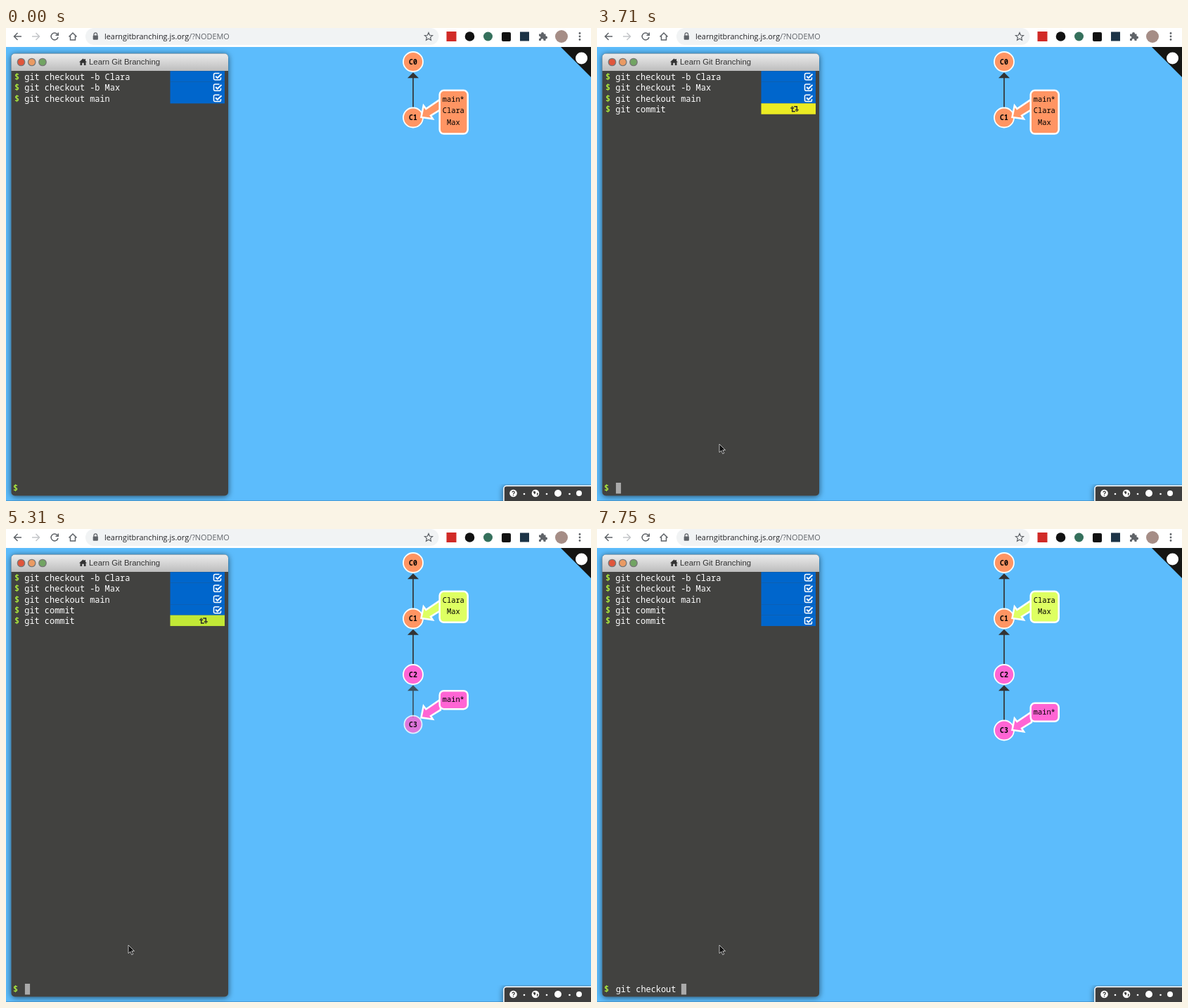
Recreate the animation shown at these times as an HTML page. Size 832 px wide and 673 px high, loop 8000 ms.

```html
<!DOCTYPE html>
<html lang="en">
<head>
<meta charset="utf-8">
<title>Git branching demo</title>
<style>
html, body { margin: 0; width: 100%; height: 100%; overflow: hidden; background: #5cbcfc; }
svg { display: block; }
text { white-space: pre; }
.mono { font-family: "Noto Sans Mono", "DejaVu Sans Mono", monospace; }
.term { font-size: 11.92px; fill: #fff; }
.dollar { font-size: 11.92px; font-weight: 700; fill: #a9e63c; }
.node { font-size: 9.8px; font-weight: 700; text-anchor: middle; }
.label { font-size: 10.35px; text-anchor: middle; }
.url { font-family: "Open Sans", "Noto Sans", sans-serif; font-size: 10.9px; fill: #202124; }
.title { font-family: "Liberation Sans", Arial, sans-serif; font-size: 11.36px; fill: #333; }
.tool { fill: none; stroke: #5f6368; stroke-width: 1.5; }
</style>
</head>
<body>
<svg width="832" height="673" viewBox="0 0 832 673" xmlns="http://www.w3.org/2000/svg">
  <defs>
    <linearGradient id="bar" x2="0" y2="1"><stop stop-color="#ececec"/><stop offset="1" stop-color="#bdbdbd"/></linearGradient>
    <filter id="shadow" x="-10%" y="-10%" width="120%" height="120%">
      <feDropShadow dx="0" dy="1" stdDeviation="4" flood-color="#000" flood-opacity=".6"/>
    </filter>
  </defs>
  <rect width="832" height="673" fill="#5cbcfc"/>
  <rect y="672" width="832" height="1" fill="#4a9cd6"/>

  <g id="window">
    <rect x="7.5" y="36.5" width="308.5" height="629" rx="5" fill="#424240" filter="url(#shadow)"/>
    <path d="M7.5 61V41.500a5 5 0 0 1 5-5H311a5 5 0 0 1 5 5V61Z" fill="url(#bar)"/>
    <g stroke="#777" stroke-width="1.3">
      <circle cx="21.500" cy="48.500" r="5.200" fill="#e0563c"/>
      <circle cx="36.700" cy="48.500" r="5.200" fill="#ea9a63"/>
      <circle cx="52" cy="48.500" r="5.200" fill="#72a463"/>
    </g>
    <path d="M104 48.500L109.500 43.500L111.500 45.300V44H113V46.700L115 48.500H113.500V53H110.800V49.800H108.200V53H105.500V48.500Z" fill="#333"/>
    <text class="title" x="118" y="52.300">Learn Git Branching</text>
  </g>

  <g id="browser">
    <rect width="832" height="27" fill="#fff"/>
    <rect x="113" y="0" width="502.500" height="24" rx="12" fill="#f1f3f4"/>
    <g class="tool">
      <path d="M22 12H12M16.500 7L11.500 12L16.500 17"/>
      <path d="M37 12H47M42.500 7L47.500 12L42.500 17" stroke="#c4c6c9"/>
      <path d="M73.200 9A5 5 0 1 0 74 13M74.300 6.500V10.300H70.500"/>
      <path d="M89.500 12.500L95 7L100.500 12.500M91.500 11.500V17H98.500V11.500"/>
      <path d="M125 11V9.200a2.300 2.300 0 0 1 4.600 0V11" stroke-width="1.200"/>
      <path d="M601 6.500L602.600 10.300L606.600 10.600L603.600 13.300L604.500 17.300L601 15.200L597.500 17.300L598.400 13.300L595.400 10.600L599.400 10.300Z" stroke-width="1.200"/>
    </g>
    <rect x="123.700" y="10.500" width="7.200" height="6.200" rx="1" fill="#5f6368"/>
    <text class="url" x="140" y="16">learngitbranching.js.org<tspan fill="#5f6368">/?NODEMO</tspan></text>
    <rect x="626.500" y="5" width="14" height="14" fill="#d12b27"/>
    <circle cx="659.500" cy="12" r="6.800" fill="#111"/>
    <circle cx="685.500" cy="12" r="6.500" fill="#35705c"/>
    <rect x="705" y="6" width="13" height="13" rx="2" fill="#111"/>
    <rect x="731" y="5.500" width="13" height="13" fill="#1c3346"/>
    <path d="M758 8.500H761V8a2 2 0 0 1 4 0V8.500H767.500V11.500H768a2 2 0 0 1 0 4H767.500V18H764.500V17a1.800 1.800 0 0 0-3.600 0V18H758V15H758.500a1.800 1.800 0 0 0 0-3.600H758Z" fill="#5f6368"/>
    <circle cx="790" cy="12" r="9" fill="#a58d86"/>
    <g fill="#5f6368"><circle cx="816" cy="7.500" r="1.400"/><circle cx="816" cy="12" r="1.400"/><circle cx="816" cy="16.500" r="1.400"/></g>
  </g>

  <path d="M789 27H832V70Z" fill="#151513"/>
  <circle cx="818.500" cy="43" r="8.500" fill="#fff"/>

  <g id="footer">
    <path d="M708 674V655.500a4 4 0 0 1 4-4H834V674Z" fill="#3d3d3c" stroke="#fff" stroke-width="1.500" filter="url(#shadow)"/>
    <g fill="#fff">
      <circle cx="721.500" cy="662" r="5.300"/><circle cx="753" cy="662" r="5.300"/>
      <circle cx="785" cy="662" r="5"/><circle cx="815" cy="662" r="4"/>
      <circle cx="737" cy="663" r="1.300"/><circle cx="769" cy="663" r="1.300"/><circle cx="801.500" cy="663" r="1.300"/>
    </g>
    <path d="M720 660.800a1.600 1.600 0 1 1 2.300 1.400q-.8.400-.8 1.100M721.500 664.300V665.500" fill="none" stroke="#3d3d3c" stroke-width="1.300"/>
    <path d="M749.500 659.500L752.500 659L753.500 661.500L751.500 663.500ZM755 661L757 662.500L755 666Z" fill="#3d3d3c"/>
  </g>

  <g id="scene"></g>
</svg>
<script>
const LOOP = 8000;
const ORANGE = [255, 149, 99], PINK = [255, 101, 212], LIME = [222, 255, 98];
const YELLOW = [235, 235, 35], GREEN = [144, 228, 76], BLUE = [0, 102, 204];
const DARK = [40, 40, 40], WHITE = [255, 255, 255];
const CHAR = 7.152, ROW = 15.35, NODE_X = 579;
const BRANCHES = ['Clara', 'Max'];
const nodeY = i => 48 + i * 79.5;

// Each commit: Enter pressed, processing, graph motion, finished.
const commits = [
  { enter: 3290, process: 3695, birth: 3755, done: 4555 },
  { enter: 4510, process: 4975, birth: 5035, done: 5800 },
];

const typing = [
  [500, ''], [1580, 'gi'], [1790, 'git'], [1890, 'git '], [2100, 'git co'],
  [2390, 'git com'], [2590, 'git comm'], [2780, 'git commi'], [2880, 'git commit'],
  [3290, ''], [4310, 'git commit'], [4510, ''],
  [6030, 'g'], [6130, 'gi'], [6230, 'git'], [6430, 'git '], [6630, 'git ch'],
  [6740, 'git che'], [6930, 'git chec'], [7030, 'git check'], [7230, 'git checko'],
  [7330, 'git checkou'], [7440, 'git checkout'], [7750, 'git checkout '],
];

const pointer = [
  [100, 474, 624], [190, 300, 606], [280, 174, 592],
  [500, 176, 583], [580, 174, 592], [780, 173.500, 591.500],
];

const latest = (steps, t) => steps.filter(s => s[0] <= t).pop();
const clamp = v => Math.max(0, Math.min(1, v));
const lerp = (a, b, p) => a + (b - a) * p;
const mix = (a, b, p) => a.map((v, i) => lerp(v, b[i], p));
const rgb = c => `rgb(${c.map(Math.round)})`;
const easeInOut = p => (1 - Math.cos(Math.PI * clamp(p))) / 2;

function bounce(p) {
  p = clamp(p) * 2.75;
  if (p < 1) return p * p;
  if (p < 2) return (p - 1.5) ** 2 + .75;
  if (p < 2.5) return (p - 2.25) ** 2 + .9375;
  return (p - 2.625) ** 2 + .984375;
}

const text = (cls, x, y, s) => `<text class="mono ${cls}" x="${x}" y="${y}">${s}</text>`;

function icon(kind, y, color) {
  const box = '<path d="M4.500 1V2.800a1.800 1.800 0 0 1-1.800 1.800H-3.700a1.800 1.800 0 0 1-1.800-1.800V-2.800a1.800 1.800 0 0 1 1.800-1.800H2.500"/>';
  const shapes = {
    queued: [260.500, '<rect x="-5" y="-4.200" width="10" height="8.400" rx="1.500"/>'],
    busy: [281, '<path d="M-3.300 -2V3.500H.8M3.300 2V-3.500H-.8"/><path d="M-5.500 -1L-3.300 -3.800L-1.100 -1ZM5.500 1L3.300 3.800L1.100 1Z" stroke-width="1"/>'],
    done: [301, box + '<path d="M-2.800 -.6L-.3 2L5.500 -3.700" stroke-width="2"/>'],
  };
  const [x, body] = shapes[kind];
  return `<g transform="translate(${x} ${y})" fill="none" stroke="${color}" stroke-width="1.500">${body}</g>`;
}

function commandRow(i, command, fill, kind, ink) {
  const top = 61.2 + i * ROW;
  return `<rect x="233.500" y="${top}" width="77.500" height="${ROW + .1}" fill="${rgb(fill)}"/>`
    + text('dollar', 12, top + 12.800, '$') + text('term', 26.300, top + 12.800, command)
    + icon(kind, top + 8, rgb(ink));
}

function terminal(t, q) {
  const history = [`git checkout -b ${BRANCHES[0]}`, `git checkout -b ${BRANCHES[1]}`, 'git checkout main'];
  let out = history.map((c, i) => commandRow(i, c, BLUE, 'done', WHITE)).join('');
  commits.forEach((c, i) => {
    if (t < c.enter) return;
    const started = easeInOut((q - c.process) / 700);
    const finished = easeInOut((q - c.done) / 700);
    const kind = q >= c.done ? 'done' : q >= c.process ? 'busy' : 'queued';
    const fill = mix(mix(YELLOW, GREEN, started), BLUE, finished);
    out += commandRow(3 + i, 'git commit', fill, kind, mix(DARK, WHITE, finished));
  });
  out += text('dollar', 10, 659, '$');
  const typed = latest(typing, t);
  if (typed) {
    out += text('term', 26.700, 659, typed[1]);
    out += `<rect x="${26.900 + typed[1].length * CHAR}" y="647" width="7.200" height="15.500" fill="#aaa"/>`;
  }
  return out;
}

function edge(parentY, childY) {
  const tip = parentY + 15.200;
  return `<path d="M${NODE_X} ${tip + 7}V${Math.max(tip + 7, childY)}" stroke="#333" stroke-width="1.700"/>`
    + `<path d="M${NODE_X} ${tip}l8 8h-16Z" fill="#333"/>`;
}

function node(i, y, color, p = 1) {
  return `<circle cx="${NODE_X}" cy="${y}" r="${14 * p}" fill="${rgb(color)}" stroke="#fff" stroke-width="1.800" opacity="${p * p}"/>`
    + `<g opacity="${p}">${text('node', NODE_X, y + 3.500, 'C' + i)}</g>`;
}

function branchLabel(y, names, height, color, opacity = 1) {
  const paint = `fill="${rgb(color)}" stroke="#fff" stroke-width="2.500"`;
  const lines = names.map((n, i) => text('label', 636.300, y - 22.400 + i * 16.200, n)).join('');
  return `<g opacity="${opacity}">`
    + `<path d="M590.500 ${y - .5}l3.300 -16.500l3.600 4.600l20.600 -14v15l-14 8.600l3 4.600Z" ${paint}/>`
    + `<rect x="616.700" y="${y - 38.700}" width="40" height="${height}" rx="6" ${paint}/>${lines}</g>`;
}

function graph(q) {
  const moved = commits.map(c => easeInOut((q - c.birth) / 400));
  let edges = edge(nodeY(0), nodeY(1)), nodes = '';
  commits.forEach((c, i) => {
    if (q < c.birth) return;
    const n = i + 2, p = bounce((q - c.birth) / 800);
    edges += `<g opacity="${moved[i]}">${edge(nodeY(n - 1), lerp(nodeY(n - 1), nodeY(n), moved[i]))}</g>`;
    nodes = node(n, lerp(nodeY(n - 1), nodeY(n), p), PINK, p) + nodes;
  });
  nodes += node(1, nodeY(1), ORANGE) + node(0, nodeY(0), ORANGE);

  const split = q >= commits[0].birth;
  const mainY = nodeY(1 + moved[0] + moved[1]);
  const mainNames = split ? ['main*'] : ['main*', ...BRANCHES];
  let labels = '';
  if (split) labels += branchLabel(nodeY(1), BRANCHES, 44, mix(ORANGE, LIME, moved[0]), moved[0]);
  labels += branchLabel(mainY, mainNames, lerp(61.800, 26, moved[0]), mix(ORANGE, PINK, moved[0]));
  return edges + nodes + labels;
}

function mouse(t) {
  const at = latest(pointer, t);
  if (!at) return '';
  return `<path transform="translate(${at[1]} ${at[2]})" d="M.5 .5V12.300L3.300 9.800L5.300 14.300L7.300 13.400L5.300 9H9Z" fill="#111" stroke="#ddd" stroke-width=".8"/>`;
}

const scene = document.getElementById('scene');
let shown = '';

function draw(t) {
  const q = Math.floor((t - 10) / 100) * 100 + 10;
  const markup = terminal(t, q) + graph(q) + mouse(t);
  if (markup !== shown) scene.innerHTML = shown = markup;
}

const start = performance.now();
function tick() {
  draw((performance.now() - start) % LOOP);
  requestAnimationFrame(tick);
}
tick();
</script>
</body>
</html>
```
